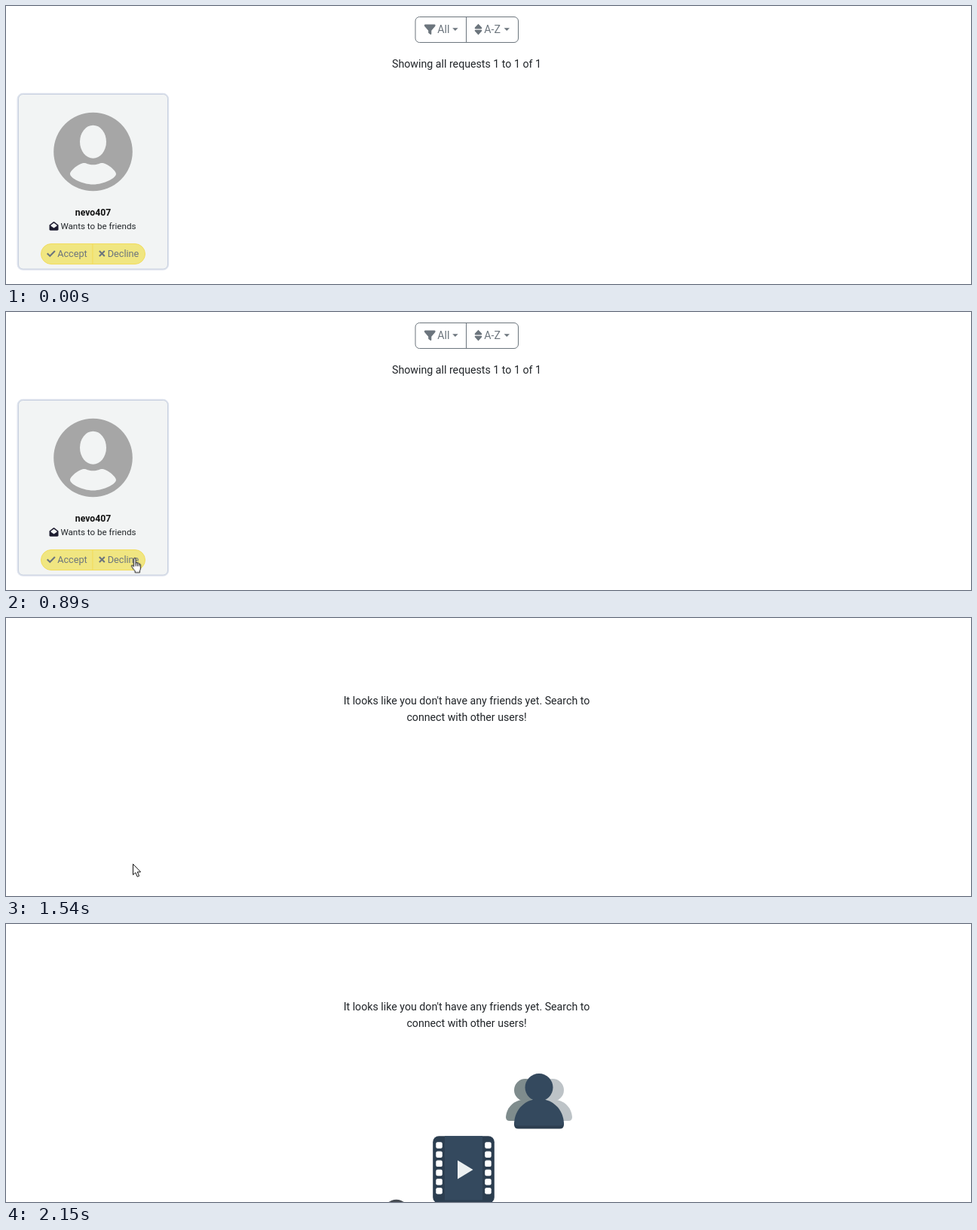
These frames come from a looping animation (1280x370 px, 2.7 s). An HTML page:

```html
<!DOCTYPE html>
<html lang="en">
<head>
<meta charset="utf-8">
<title>Friend requests</title>
<style>
html, body { margin: 0; width: 100%; height: 100%; overflow: hidden; background: #fff; }
svg { display: block; width: 100vw; height: 100vh; }
text { font: 14.2px Roboto, sans-serif; fill: #212529; }
.mid { text-anchor: middle; }
.bar text, .bar .icon { fill: #6c757d; }
.outline { fill: none; stroke: #6c757d; }
.name { font-size: 12.2px; font-weight: 700; fill: #111; }
.note { font-size: 11.6px; }
.btn { color: #6c757d; }
.btn text { font-size: 12.7px; fill: currentColor; }
.btn .mark { fill: none; stroke: currentColor; stroke-width: 2.1; }
.pill { fill: #f0e681; stroke: #f2dc5e; }
.pointer path { fill: #fff; stroke: #111; stroke-linejoin: round; }

/* hard cuts, one shared 2.7 s clock */
.requests, .empty, .icons, .arrow, .hand, .decline, .decline .pill {
  animation: 2.7s step-end infinite;
}
.empty, .icons, .arrow, .hand { opacity: 0; }
.requests { animation-name: leave; }
.empty { animation-name: enter; }
.icons { animation-name: load; }
.arrow { animation-name: move; }
.hand { animation-name: point; }
.decline { animation-name: ink; }
.decline .pill { animation-name: hover; }

@keyframes leave { 57.03% { opacity: 0; } }
@keyframes enter { 57.03% { opacity: 1; } }
@keyframes load { 59.99% { opacity: 1; } }
@keyframes point {
  32.96% { opacity: 1; transform: translate(165.8px, 326.7px); }
  57.03% { opacity: 0; }
}
@keyframes ink {
  36.29% { color: #8b9193; }
  38.88% { color: #e9eaeb; }
  43.7% { color: #fff; }
}
@keyframes hover {
  36.29% { fill: #d4cd83; stroke: #cbc377; }
  38.88% { fill: #80867d; stroke: #80867a; }
  43.7% { fill: #6c757d; stroke: #6c757d; }
}
@keyframes move {
  10.74% { opacity: 1; transform: translate(1192px, 354px); }
  13.7% { opacity: 1; transform: translate(985px, 330px); }
  16.29% { opacity: 1; transform: translate(765px, 308px); }
  18.88% { opacity: 1; transform: translate(560px, 293px); }
  21.85% { opacity: 1; transform: translate(390px, 288px); }
  24.44% { opacity: 1; transform: translate(277px, 307px); }
  27.4% { opacity: 1; transform: translate(225px, 311px); }
  29.99% { opacity: 1; transform: translate(196px, 314px); }
  32.96% { opacity: 0; transform: translate(168px, 327px); }
  57.03% { opacity: 1; transform: translate(168px, 327px); }
  59.99% { opacity: 1; transform: translate(174px, 327px); }
  62.96% { opacity: 1; transform: translate(205px, 325px); }
  65.55% { opacity: 1; transform: translate(278px, 321px); }
  68.14% { opacity: 1; transform: translate(395px, 317px); }
  70.73% { opacity: 1; transform: translate(540px, 314px); }
  73.7% { opacity: 1; transform: translate(704px, 314px); }
  76.66% { opacity: 1; transform: translate(960px, 344px); }
  79.62% { opacity: 0; }
}
</style>
</head>
<body>
<svg viewBox="0 0 1280 370">
  <defs>
    <rect id="hole" width="8.5" height="8.5" rx="2.2" fill="#fff"/>
    <g id="holes">
      <use href="#hole" y="290.3"/>
      <use href="#hole" y="302.4"/>
      <use href="#hole" y="314.6"/>
      <use href="#hole" y="326.7"/>
      <use href="#hole" y="338.9"/>
      <use href="#hole" y="351"/>
    </g>
    <g id="friend">
      <circle cx="689" cy="221" r="15"/>
      <path d="M663 257C664 243 675 233.5 689 233.5H707V262H668Q663 262 663 257Z"/>
    </g>
    <path id="caret" d="M0 0H7.4L3.7 3.8Z"/>
  </defs>

  <g class="requests">
    <g class="bar">
      <rect class="outline" x="543" y="14.5" width="136.5" height="34" rx="5.5"/>
      <path class="outline" d="M610.5 14.5V48.5"/>
      <path class="icon" d="M556.2 24.5H568.3Q570.4 25 569.2 27L564.3 32.8V37.2Q563.9 38.4 562.7 37.7L560.2 35.8V32.8L555.2 27Q554 25 556.2 24.5Z"/>
      <text x="572.3" y="36">All</text>
      <use class="icon" href="#caret" x="592.2" y="29.3"/>
      <path class="icon" d="M626.5 23.8L631 28.6Q632 30.3 630.4 30.5H622.6Q621 30.3 622 28.6ZM626.5 38.4L631 33.6Q632 31.9 630.4 31.7H622.6Q621 31.9 622 33.6Z"/>
      <text x="634.3" y="36">A-Z</text>
      <use class="icon" href="#caret" x="660.6" y="29.3"/>
    </g>
    <text class="mid" x="611" y="82">Showing all requests 1 to 1 of 1</text>

    <rect x="16" y="117.3" width="198.7" height="233" rx="6.5" fill="none" stroke="#dfe4ee" stroke-width="3"/>
    <rect x="16.5" y="117.5" width="198" height="232.5" rx="6" fill="#f2f4f4" stroke="#c9d1e0"/>
    <circle cx="115.5" cy="194" r="52.3" fill="#a6a6a6"/>
    <g fill="#f2f4f4">
      <ellipse cx="115.5" cy="180.7" rx="17.5" ry="22"/>
      <path d="M85 223.5C85 219 97 209 103.5 209C107 209 109 211.3 115.5 211.3S124 209 127.5 209C134 209 146 219 146 223.5C146 229 130 237.5 115.5 237.5S85 229 85 223.5Z"/>
    </g>
    <text class="name mid" x="115.5" y="279">nevo407</text>
    <path fill="#1d1c30" d="M57.5 291.6L62.6 287.4Q63.5 286.8 64.4 287.4L69.5 291.6V297.3Q69.5 298.7 68.1 298.7H58.9Q57.5 298.7 57.5 297.3Z"/>
    <path fill="#f2f4f4" d="M59.5 291.8L63.5 288.8L67.5 291.8V292.8L63.5 295.6L59.5 292.8Z"/>
    <text class="note" x="72.4" y="297">Wants to be friends</text>

    <g class="btn">
      <path class="pill" d="M115 316.5H60a13.5 13.5 0 0 0 0 27H115Z"/>
      <path class="mark" d="M54.7 329.3L58.3 332.8L64.9 326.1"/>
      <text x="68.2" y="334">Accept</text>
    </g>
    <g class="btn decline">
      <path class="pill" d="M115 316.5H171a13.5 13.5 0 0 1 0 27H115Z"/>
      <path class="mark" d="M123.8 325.9l7 7m0-7l-7 7"/>
      <text x="134.7" y="334">Decline</text>
    </g>
  </g>

  <g class="empty">
    <text class="mid" x="611" y="115">It looks like you don't have any friends yet. Search to</text>
    <text class="mid" x="611" y="136.5">connect with other users!</text>
  </g>

  <g class="icons">
    <use href="#friend" fill="#7f8c8d"/>
    <use href="#friend" fill="#bdc3c7" transform="translate(1414) scale(-1 1)"/>
    <path fill="#2c3e50" d="M674 264H740V267Q740 272.5 734.5 272.5H679.5Q674 272.5 674 267Z"/>
    <path fill="#34495e" d="M674 265C675 246 689 233 707 233S739 246 740 265Q739 268.5 734.5 268.5H679.5Q675 268.5 674 265Z"/>
    <circle cx="707" cy="217.5" r="18.5" fill="#34495e"/>

    <rect x="566.2" y="282.2" width="81.6" height="89.5" rx="8" fill="#2c3e50"/>
    <rect x="582" y="282.2" width="50" height="85.3" fill="#34495e"/>
    <use href="#holes" x="570.3"/>
    <use href="#holes" x="635.2"/>
    <path fill="#ecf0f1" d="M599 314.5L619.5 327L599 339.5Z"/>
    <circle cx="517.7" cy="383.3" r="16.5" fill="#464b52"/>
  </g>

  <g class="pointer">
    <g class="arrow">
      <path d="M.5 .5V14.8L3.8 11.9L6.2 17.3L8.6 16.3L6.3 11H10.6Z"/>
    </g>
    <g class="hand">
      <path d="M3.6 12.2V2Q3.6 .6 4.9 .6T6.2 2V7.5Q6.4 6.6 7.4 6.7T8.5 8.1Q8.8 7.2 9.7 7.4T10.7 8.9Q11 8.1 11.8 8.4T12.7 10V14Q12.7 16 11.6 17.5V20H5.3V18Q3 15.5 1 12.2Q.2 10.6 1.2 10.2Q2.2 9.9 3.6 12.2Z"/>
      <path d="M6.2 7.5v4M8.5 8.3v3.2M10.7 9v2.5"/>
    </g>
  </g>
</svg>
</body>
</html>
```
